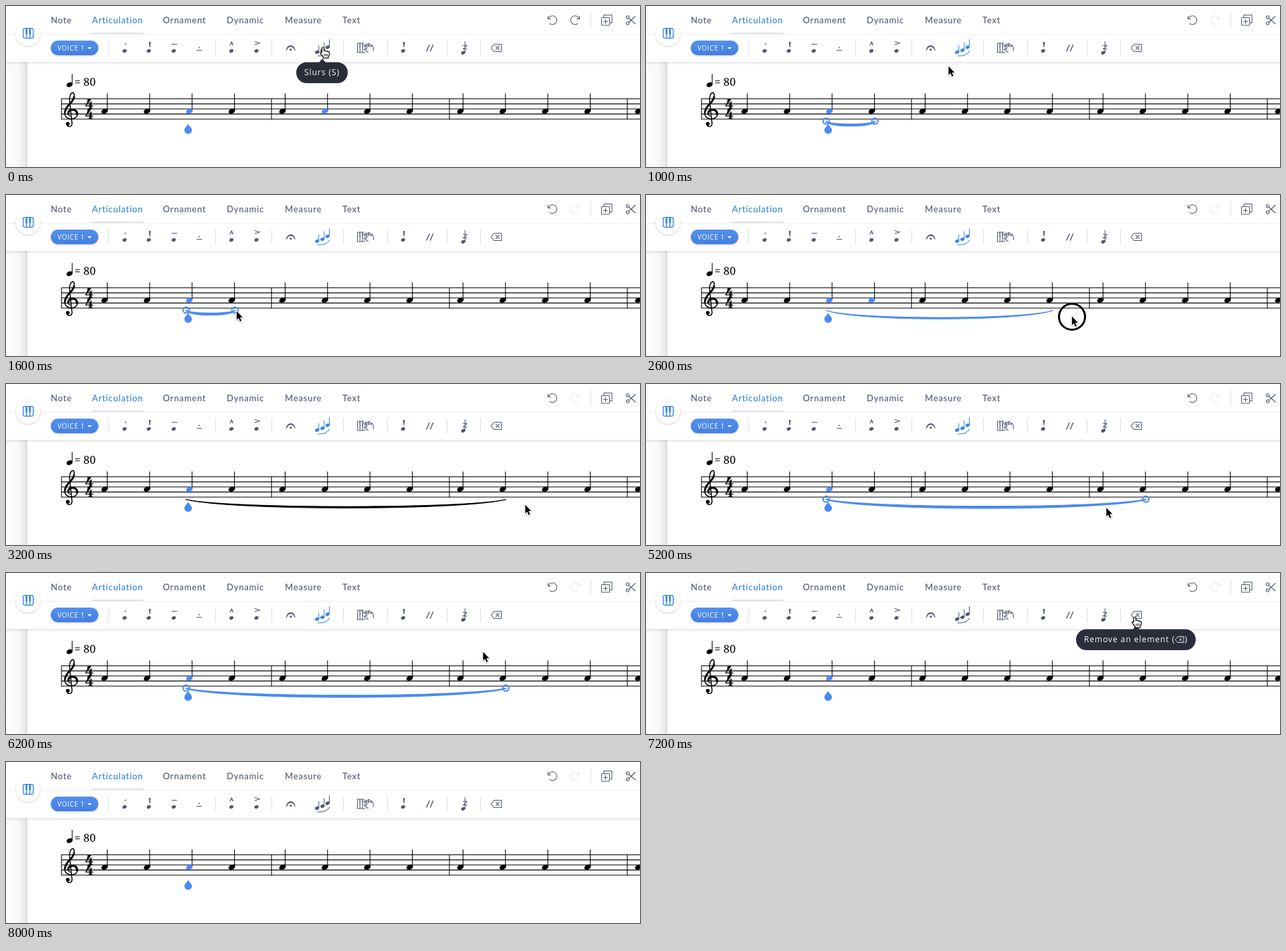
An HTML page that plays this animation: 948 px wide and 242 px high, repeating every 8.4 s.

```html
<!DOCTYPE html>
<html lang="en">
<head>
<meta charset="utf-8">
<title>Slur editing</title>
<style>
html, body { margin: 0; width: 100%; height: 100%; overflow: hidden; background: #fff; }
svg { display: block; width: 948px; height: 242px; }
.nav text { font: 500 13px Lato, sans-serif; letter-spacing: .8px; fill: #535b73; }
.nav .on { fill: #2f80e0; }
.voice { font: 10px "Open Sans", sans-serif; letter-spacing: .6px; fill: #fff; }
.tip text { font: 12px "Open Sans", sans-serif; letter-spacing: .95px; fill: #fff; }
.tip path, .tip rect { fill: #2a2d3a; }
.tempo { font: 16.4px "Noto Serif", serif; }
.ico { color: #4f5870; fill: currentColor; stroke: none; }
.ico .l { fill: none; stroke: currentColor; stroke-width: 1.05; stroke-linecap: round; stroke-linejoin: round; }
.ico .b { stroke-width: 1.4; }
.ico.on { color: #3b84f0; }
.ico.off { color: #e4e6ea; }
.sep { stroke: #dcdee4; }
</style>
</head>
<body>
<svg viewBox="0 0 948 242" xmlns="http://www.w3.org/2000/svg">
  <defs>
    <linearGradient id="edge">
      <stop offset="0" stop-color="#fdfdfd"/><stop offset=".55" stop-color="#f8f8f8"/>
      <stop offset=".85" stop-color="#ebebeb"/><stop offset="1" stop-color="#dcdcdc"/>
    </linearGradient>
    <linearGradient id="under" x2="0" y2="1">
      <stop offset="0" stop-opacity=".09"/><stop offset="1" stop-opacity="0"/>
    </linearGradient>
    <linearGradient id="pill" x2="0" y2="1">
      <stop offset="0" stop-color="#5290f0"/><stop offset="1" stop-color="#457fe0"/>
    </linearGradient>
    <filter id="soft" x="-40%" y="-40%" width="180%" height="180%">
      <feDropShadow dx="0" dy="1" stdDeviation="1.8" flood-opacity=".22"/>
    </filter>
    <filter id="lift" x="-60%" y="-60%" width="220%" height="220%">
      <feDropShadow dx="0" dy="1" stdDeviation=".8" flood-opacity=".35"/>
    </filter>
    <ellipse id="dot" rx="3.2" ry="2.4" transform="rotate(-25)"/>
    <path id="four" d="M3.5 0H9C7 4 4 8 1.5 10H6.2V6.5L9.5 3.5V10H12V11.3H9.5V12.5C9.5 13.8 10 14 11 14.2V15H4.6V14.2C5.8 14 6.2 13.6 6.2 12.5V11.3H0V10.3C2 8 3.5 4 3.5 0Z"/>
    <path id="wedge" d="M-1.4 0H1.4L.5 8H-.5Z"/>
    <path id="erase" fill="none" stroke="currentColor" stroke-width="1.1" stroke-linejoin="round" stroke-linecap="round"
      d="M-8 0L-3.5 -5.5H7.5V5.5H-3.5ZM-.8 -2.6L4.2 2.6M4.2 -2.6L-.8 2.6"/>
  </defs>

  <rect width="948" height="242" fill="#fff"/>
  <rect y="84" width="32" height="158" fill="url(#edge)"/>

  <!-- score -->
  <g id="score">
    <text class="tempo" x="102.3" y="120">= 80</text>
    <ellipse cx="95" cy="118.3" rx="4.6" ry="3.3" transform="rotate(-25 95 118.3)"/>
    <path d="M99 102V117.5" stroke="#000" stroke-width="1.1"/>
    <g fill="none" stroke="#000" stroke-linecap="round">
      <path stroke-width="1.5" d="M91 178C92 182.5 99.2 182.5 98.7 176L95.3 144C94 136 97 130.5 100 130C102.5 131 103 137 100 142.5C97 147.5 88 151.5 87.5 160C87.5 166 92 169.8 97.5 169.8C103 169.8 107 166.5 107 162C107 157.5 103.5 155 99.5 155C95 155 92 158 92.5 161.5C92.8 163.8 94.5 165 96 165.5"/>
      <path stroke-width="2.9" d="M101.5 137C101 145 88.5 150 88.4 159.5M106.2 163C106.4 157.5 102.5 156 99.5 156C95.5 156 93 158.5 93.4 161.5"/>
    </g>
    <circle cx="92.4" cy="177" r="2.8"/>
    <use href="#four" x="118.5" y="139.5"/><use href="#four" x="118.5" y="154.8"/>
  </g>
  <g id="slur" stroke-linejoin="round" stroke-linecap="round">
    <path id="arc"/>
    <g id="ends" fill="none" stroke="#4a8af4" stroke-width="2">
      <circle cx="269.3" cy="173" r="4.6"/><circle id="end" cy="173" r="4.6"/>
    </g>
  </g>
  <path fill="#4a8af4" d="M272.4 177.3C274 180.8 278 183 278 186.7A5.6 5.3 0 0 1 266.8 186.7C266.8 183 270.8 180.8 272.4 177.3Z"/>

  <!-- header -->
  <rect width="948" height="84" fill="#fff"/>
  <rect y="84" width="948" height="5" fill="url(#under)"/>
  <path d="M0 42.5H948" stroke="#eeeff1"/>
  <rect x="128" y="40" width="77" height="2" fill="#e0e2e5"/>
  <g class="nav">
    <text x="67" y="26">Note</text><text x="128.5" y="26" class="on">Articulation</text>
    <text x="234.5" y="26">Ornament</text><text x="330" y="26">Dynamic</text>
    <text x="417" y="26">Measure</text><text x="503" y="26">Text</text>
  </g>
  <circle cx="33" cy="41.5" r="18" fill="#fff" filter="url(#soft)"/>
  <g fill="none" stroke="#2f80e0" stroke-width="1.3">
    <rect x="25.7" y="33.7" width="15" height="14.6" rx="2.5"/>
    <path d="M30.6 42V48M35.8 42V48"/>
    <path stroke-width="2.6" d="M30.6 34V42.5M35.8 34V42.5"/>
  </g>
  <rect x="67" y="52" width="71" height="22" rx="11" fill="url(#pill)" filter="url(#soft)"/>
  <text class="voice" x="77" y="66.8">VOICE 1</text>
  <path d="M121.8 62H128.2L125 65.3Z" fill="#fff"/>
  <path class="sep" d="M153.5 52V74M313.5 52V74M397.5 52V74M504.5 52V74M570.5 52V74M659.5 52V74M709.5 52V74M874.5 10V32"/>

  <g class="ico">
    <use href="#dot" x="177.3" y="67.5"/><circle cx="178.5" cy="57.5" r="1.1"/>
    <use href="#dot" x="213.5" y="67.5"/><use href="#wedge" x="215" y="54"/>
    <use href="#dot" x="250.8" y="67.5"/><path class="l" d="M248 57.5H255.5"/>
    <circle cx="289" cy="62.5" r="1"/><path class="l" d="M285.5 66.5H292.5"/>
    <use href="#dot" x="337" y="67.5"/><path class="l b" d="M335.2 58.5L337.3 54L339.4 58.5"/>
    <use href="#dot" x="374.5" y="67.5"/><path class="l" d="M372 53.5L379.5 55.8L372 58"/>
    <path d="M419 67C419 56.5 432.5 56.5 432.5 67H431.6C430.5 59.5 421 59.5 419.9 67Z"/><circle cx="425.8" cy="65.6" r="1.6"/>
    <path class="l" d="M537 70H525.5V56H535M529.3 64V70M533.2 64V70"/>
    <path class="l b" d="M529.3 56V63.5M533.2 56V63.5"/>
    <path class="l" d="M541.5 69.5C539 68 537 67 535.5 65.2C536 64 538 64.6 540 65L535 59.5C535.5 58 537 59 540.5 62.5L537.5 57.5C538.5 56 540 57.5 543 61.5L541.5 56.5C543 55.5 544.5 57.5 546 61.5L546.5 58.5C549 59 549.5 63 549.3 67.5"/>
    <use href="#dot" x="593.7" y="67.5"/><use href="#wedge" x="595" y="54"/>
    <path class="l b" d="M629 68L633 58.5M634.5 68L638.5 58.5"/>
    <use href="#dot" x="683.7" y="70.3"/><path class="l" d="M686.3 53.5V69.5M683.3 59.3H689.3L683.3 64.8H689.3"/>
    <use href="#erase" x="733.3" y="63"/>
    <path class="l" d="M810.5 15.5V19.5H814.5M811 19.2A6.5 6.5 0 1 1 813.3 26.5"/>
    <rect class="l" x="890.5" y="17.5" width="12" height="11.5" rx="1"/>
    <path class="l" d="M894 17V13.5H906V25.5H903M896.5 20V26.5M893.2 23.2H899.8"/>
    <circle class="l" cx="929.6" cy="17" r="2.2"/><circle class="l" cx="929.6" cy="26" r="2.2"/>
    <path class="l" d="M931.5 18.5L941 27M931.5 24.5L941 15.5"/>
  </g>
  <g class="ico" id="redo"><path class="l" d="M857.5 15.5V19.5H853.5M857 19.2A6.5 6.5 0 1 0 854.7 26.5"/></g>
  <g class="ico" id="slurIcon">
    <use href="#dot" x="465.3" y="69.3"/><use href="#dot" x="473.2" y="66.5"/><use href="#dot" x="480.8" y="62"/>
    <path class="l" d="M467.8 68.5V59.5M475.8 65.5V55M483.5 61V50.5M466 75C473.5 75.5 480.5 73 483.5 68"/>
  </g>

  <g class="tip" id="tipSlur">
    <path d="M468 85L473 79L478 85Z"/><rect x="434" y="84.5" width="77" height="31.5" rx="15.7"/>
    <text x="446" y="104">Slurs (S)</text>
  </g>
  <g class="tip" id="tipErase">
    <path d="M728 85L733 79L738 85Z"/><rect x="643" y="84.5" width="179" height="31.5" rx="15.7"/>
    <text x="655" y="104">Remove an element (</text><text x="805.5" y="104">)</text>
    <use href="#erase" color="#fff" style="fill:none" transform="translate(798 100) scale(.8)"/>
  </g>

  <circle id="ring" r="19.5" fill="none" stroke="#000" stroke-width="3"/>
  <g id="arrow" filter="url(#lift)">
    <path d="M.4 .4V13.6L3.4 10.9L5.5 16L7.5 15.1L5.4 10.1H9.4Z" stroke="#fff" stroke-width="1.6" stroke-linejoin="round" paint-order="stroke"/>
  </g>
  <g id="hand" filter="url(#lift)" stroke="#000" stroke-width="1.1" stroke-linejoin="round">
    <path fill="#fff" d="M-1.6 1.5C-1.6 -.5 1.4 -.5 1.4 1.5V5.5C1.8 4.6 4.2 4.8 4.2 6C5 5.2 7 5.5 7 7C8 6.3 9.6 6.8 9.6 8.2C9.6 11 8.8 12.3 8 14V16H.5V14.6C-1 12.8 -2 11.2 -3.6 9.4C-5 7.8 -3.4 6.5 -2 7.6L-1.6 8Z"/>
    <path d="M2 10V13.5M4.2 10V13.5M6.4 10V13.5" stroke-width=".9"/>
  </g>
</svg>
<script>
const $ = id => document.getElementById(id);
const LOOP = 8400, BLUE = '#4a8af4', SELECTED = 2;
const NS = 'http://www.w3.org/2000/svg';

function add(tag, attrs) {
  const el = document.createElementNS(NS, tag);
  for (const k in attrs) el.setAttribute(k, attrs[k]);
  return $('score').appendChild(el);
}
const line = d => add('path', { d, stroke: '#000', 'stroke-width': 1.1 });

// Staff, bar lines and notes
for (let i = 0; i < 5; i++) line(`M83 ${139.5 + i * 7.63}H948`);
for (const x of [83, 397, 663, 929]) line(`M${x} 139V170.5`);
const noteX = i => 147.5 + Math.floor(i / 4) * 266 + (i % 4) * 63.4;
const heads = Array.from({ length: 13 }, (_, i) => {
  const x = noteX(i);
  line(`M${x + 3.9} 131.5V157`);
  return add('ellipse', { rx: 5.2, ry: 3.5, transform: `translate(${x} 158) rotate(-25)` });
});

// time, cursor, x, y, pressed, slur end note, slur look, hovered note, tooltip
const STEPS = [
  [0, 'hand', 474, 62, 0, 0, '', 5, 'tipSlur'],
  [800, 'hand', 474, 62, 1, 0, '', 5, 'tipSlur'],
  [1000, 'arrow', 452, 90, 0, 3, 'sel'],
  [1200, 'arrow', 405, 131, 0, 3, 'sel'],
  [1400, 'arrow', 362, 162, 0, 3, 'sel'],
  [1600, 'arrow', 344.5, 174, 0, 3, 'sel'],
  [1800, 'arrow', 342, 174, 0, 3, 'sel', 3],
  [2000, 'arrow', 346, 175, 1, 3, 'drag', 3],
  [2200, 'arrow', 410, 178, 1, 4, 'drag', 3],
  [2400, 'arrow', 524, 181, 1, 6, 'drag', 3],
  [2600, 'arrow', 636.5, 182, 1, 7, 'drag', 3],
  [2800, 'arrow', 746, 182.5, 1, 9, 'drag', 3],
  [3000, 'arrow', 750, 182.5, 0, 9, 'drag', 3],
  [3200, 'arrow', 776, 181, 0, 9, 'plain'],
  [3400, 'arrow', 792.5, 177.5, 0, 9, 'plain', 10],
  [4400, 'arrow', 783, 179, 0, 9, 'plain', 10],
  [4600, 'arrow', 748, 181, 0, 9, 'plain'],
  [4800, 'arrow', 706, 182, 0, 9, 'plain'],
  [5000, 'arrow', 690, 182.5, 1, 9, 'plain'],
  [5200, 'arrow', 688, 185.5, 0, 9, 'sel'],
  [5400, 'arrow', 688, 186, 0, 9, 'sel'],
  [5800, 'arrow', 690, 178, 0, 9, 'sel'],
  [6000, 'arrow', 699, 152, 0, 9, 'sel'],
  [6200, 'arrow', 713, 118, 0, 9, 'sel'],
  [6400, 'arrow', 725, 88, 0, 9, 'sel'],
  [6600, 'hand', 730, 68, 0, 9, 'sel'],
  [6800, 'hand', 731, 66, 0, 9, 'sel', -1, 'tipErase'],
  [7000, 'hand', 731, 66, 1, 9, 'sel', -1, 'tipErase'],
  [7200, 'hand', 731, 66, 0, 0, '', -1, 'tipErase'],
  [7600, 'arrow', 800, 55, 0, 0, ''],
  [7800, 'arrow', 915, 38, 0, 0, ''],
  [8000, '', 0, 0, 0, 0, '']
];

const show = (id, on) => $(id).setAttribute('display', on ? 'inline' : 'none');

function drawSlur(endNote, look) {
  show('slur', look);
  show('ends', look === 'sel');
  if (!look) return;
  const x1 = 269.3, x2 = noteX(endNote) + 4.6, w = x2 - x1, y = 173.6;
  const low = y + Math.min(12.8, 4.6 + w * .024) * 4 / 3, high = low - 3;
  const a = x1 + w * .13, b = x2 - w * .13;
  const color = look === 'plain' ? '#000' : BLUE;
  const arc = $('arc');
  arc.setAttribute('d', `M${x1} ${y}C${a} ${low} ${b} ${low} ${x2} ${y}` +
    `C${b} ${high} ${a} ${high} ${x1} ${y}Z`);
  arc.setAttribute('fill', color);
  arc.setAttribute('stroke', color);
  arc.setAttribute('stroke-width', look === 'sel' ? 2.1 : 1);
  $('end').setAttribute('cx', x2);
}

function draw([time, cursor, x, y, pressed, endNote, look, hover = -1, tip]) {
  heads.forEach((h, i) => h.setAttribute('fill', i === SELECTED || i === hover ? BLUE : '#000'));
  drawSlur(endNote, look);
  $('slurIcon').classList.toggle('on', !!look);
  $('redo').classList.toggle('off', time >= 1000);
  for (const id of ['tipSlur', 'tipErase']) show(id, id === tip);
  for (const id of ['arrow', 'hand']) {
    show(id, id === cursor);
    $(id).setAttribute('transform', `translate(${x} ${y})`);
  }
  show('ring', pressed);
  const [dx, dy] = cursor === 'hand' ? [2, 4] : [.5, 1];
  $('ring').setAttribute('transform', `translate(${x + dx} ${y + dy})`);
}

const start = performance.now();
let current;
function tick() {
  const t = (performance.now() - start) % LOOP;
  const step = STEPS.findLast(s => s[0] <= t);
  if (step !== current) draw(current = step);
  requestAnimationFrame(tick);
}
tick();
</script>
</body>
</html>
```
